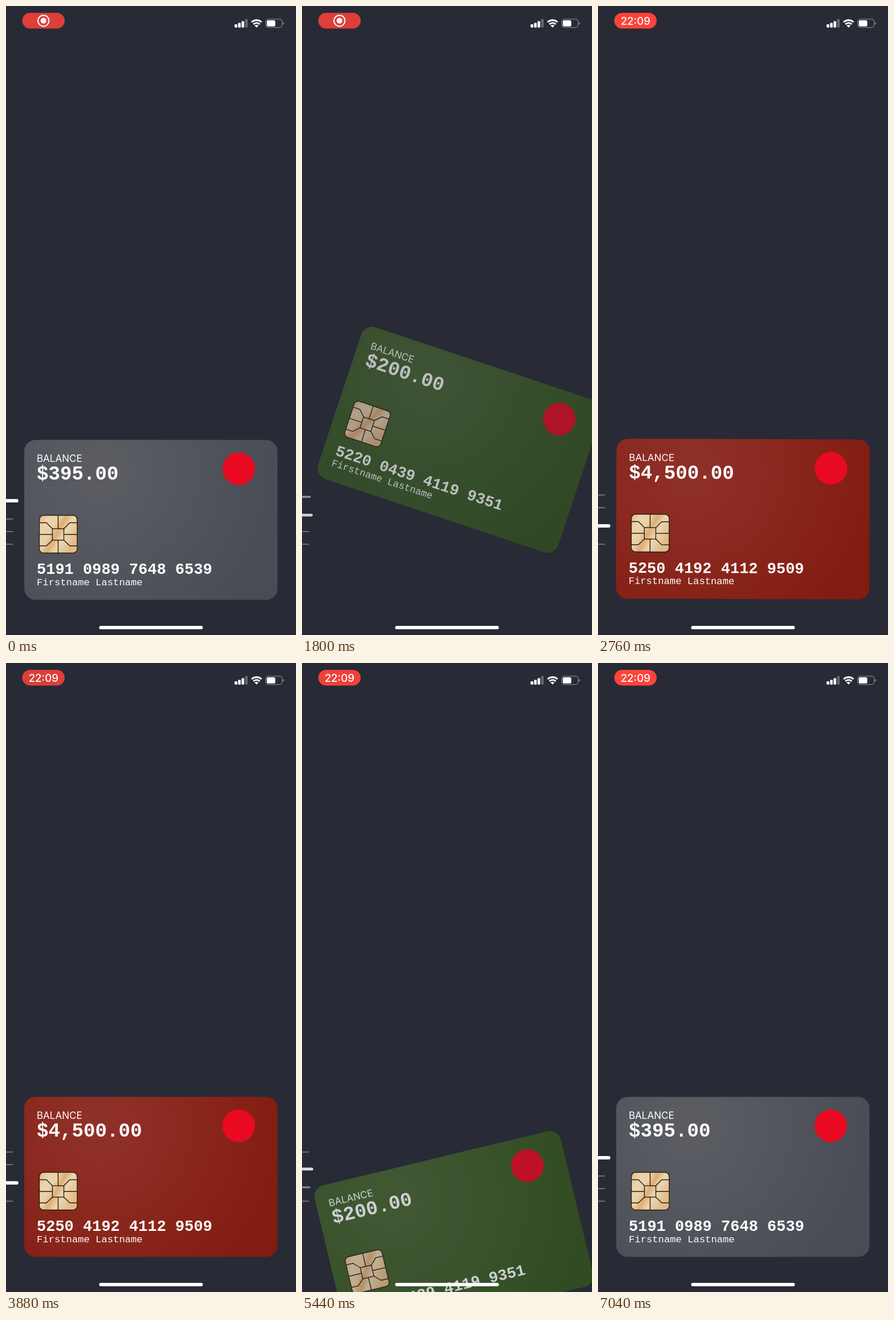
Recreate the animation shown at these times as an HTML page. Size 509 px wide and 1101 px high, loop 7080 ms.

```html
<!DOCTYPE html>
<html lang="en">
<head>
<meta charset="utf-8">
<title>Card wheel</title>
<style>
  html, body { margin: 0; width: 100%; height: 100%; overflow: hidden; background: #282a36; }
  svg { display: block; width: 100%; height: 100%; }
  .ui { font-family: Inter, Roboto, sans-serif; }
  .mono { font-family: "Liberation Mono", "Courier New", monospace; }
</style>
</head>
<body>
<svg viewBox="0 0 509 1101" preserveAspectRatio="xMinYMin meet">
  <defs>
    <linearGradient id="gold" x1="0" y1="0" x2="1" y2=".55">
      <stop offset="0" stop-color="#e3b987"/>
      <stop offset=".22" stop-color="#ecd5ae"/>
      <stop offset=".42" stop-color="#ead0a6"/>
      <stop offset=".56" stop-color="#dfae76"/>
      <stop offset=".72" stop-color="#ecd7b2"/>
      <stop offset="1" stop-color="#e2bb88"/>
    </linearGradient>
    <g id="chip" stroke="#2b1c12" stroke-width="1.4" fill="none">
      <rect x="58.5" y="891.5" width="66.5" height="66" rx="7.5" fill="url(#gold)"/>
      <rect x="81.5" y="915" width="20" height="20"/>
      <path d="M91.5 891.5V915M91.5 935V957.5M58.5 925H81.5M101.5 925H125"/>
      <path d="M58.5 904.5H71L81.5 915M125 904.5H112L101.5 915M58.5 945H71L81.5 935M125 945H112L101.5 935"/>
    </g>
  </defs>

  <g id="dashes"></g>
  <g id="cards"></g>

  <rect id="pill" x="28.5" y="12" width="74.5" height="27.5" rx="13.75" fill="#ff443a"/>
  <g id="rec" fill="#fff">
    <circle cx="65.8" cy="25.8" r="9.6" fill="none" stroke="#fff" stroke-width="2"/>
    <circle cx="65.8" cy="25.8" r="5"/>
  </g>
  <text id="clock" class="ui" x="65.8" y="32.6" font-size="18.6" font-weight="500" fill="#fff" text-anchor="middle">22:09</text>

  <g fill="#fff">
    <rect x="401.2" y="32" width="4.6" height="5.8" rx="1.2"/>
    <rect x="407.3" y="29.6" width="4.6" height="8.2" rx="1.2"/>
    <rect x="413.4" y="26.4" width="4.6" height="11.4" rx="1.2"/>
    <rect x="419.5" y="23" width="4.6" height="14.8" rx="1.2" opacity=".3"/>
    <path d="M439.8 37.8L436.4 34.3A4.9 4.9 0 0 1 443.2 34.3Z"/>
    <path d="M434.2 31.9A8 8 0 0 1 445.4 31.9M431.1 28.3A12.6 12.6 0 0 1 448.5 28.3" fill="none" stroke="#fff" stroke-width="2.9"/>
    <rect x="456" y="23.2" width="28.6" height="14.4" rx="4.4" fill="none" stroke="#fff" stroke-opacity=".42" stroke-width="1.2"/>
    <rect x="457.8" y="25" width="14.8" height="10.8" rx="2.6"/>
    <path d="M486 28V33Q488 32.3 488 30.5T486 28" opacity=".45"/>
  </g>
  <rect x="163.5" y="1085" width="182" height="6" rx="3" fill="#fff"/>
</svg>

<script>
const LOOP = 7080, STEP = 40, TURN = 60;
const PIVOT = "698 899.5";
const CLOCK_AT = 2320;

const cards = [
  { balance: "$395.00", number: "5191 0989 7648 6539", from: "#5a5c62", mid: "#52555c", to: "#484c55" },
  { balance: "$200.00", number: "5220 0439 4119 9351", from: "#476532", mid: "#3f5f2a", to: "#34561d" },
  { balance: "$4,500.00", number: "5250 4192 4112 9509", from: "#8f3028", mid: "#8a271d", to: "#831c10" },
];

// time, wheel position
const wheel = [
  [0, 0], [1480, 0], [1560, .06], [1680, .39], [1800, .693], [1920, .89], [2040, .975], [2160, 1],
  [2240, 1.04], [2360, 1.36], [2480, 1.71], [2600, 1.92], [2760, 1.997], [2880, 2],
  [4840, 2], [4920, 1.97], [5120, 1.75], [5280, 1.5], [5440, 1.225], [5600, 1.06], [5840, 1],
  [6200, 1], [6240, .997], [6360, .9], [6560, .52], [6720, .22], [6880, .04], [7020, 0], [7080, 0],
];

// time, opacity of the red pill
const pulse = [
  [0, .85], [160, .87], [560, 1], [1600, .83], [1800, .85], [2680, 1], [3740, .83],
  [4800, 1], [5440, .92], [5860, .86], [6240, .9], [6920, 1], [7080, 1],
];

// monotone cubic through the points
function curve(pts) {
  const rate = i => (pts[i + 1][1] - pts[i][1]) / (pts[i + 1][0] - pts[i][0]);
  const slope = pts.map((p, i) => {
    if (!i || i === pts.length - 1) return 0;
    const a = rate(i - 1), b = rate(i);
    return a * b > 0 ? 2 * a * b / (a + b) : 0;
  });
  return t => {
    let i = 0;
    while (i < pts.length - 2 && t >= pts[i + 1][0]) i++;
    const [t0, v0] = pts[i], [t1, v1] = pts[i + 1];
    const h = t1 - t0, u = (t - t0) / h, w = 1 - u;
    return v0 * (1 + 2 * u) * w * w + slope[i] * h * u * w * w
      + v1 * u * u * (3 - 2 * u) - slope[i + 1] * h * u * u * w;
  };
}

const wheelAt = curve(wheel), pulseAt = curve(pulse);
const $ = id => document.getElementById(id);
const set = (el, attrs) => { for (const k in attrs) el.setAttribute(k, attrs[k]); };

function label(cls, y, size, weight, text) {
  return `<text class="${cls}" x="54" y="${y}" font-size="${size}" font-weight="${weight}">${text}</text>`;
}

$("cards").innerHTML = cards.map((c, i) => `
  <g fill="#fff">
    <radialGradient id="skin${i}" gradientUnits="userSpaceOnUse" cx="165" cy="815" r="330">
      <stop offset=".1" stop-color="${c.from}"/>
      <stop offset=".5" stop-color="${c.mid}"/>
      <stop offset="1" stop-color="${c.to}"/>
    </radialGradient>
    <rect x="32" y="759.5" width="444.5" height="280" rx="20" fill="url(#skin${i})"/>
    ${label("ui", 798.3, 17, 400, "BALANCE")}
    ${label("mono", 829, 34.2, 700, c.balance)}
    <circle cx="408.5" cy="810" r="28.5" fill="#e90a22"/>
    <use href="#chip"/>
    ${label("mono", 994, 27, 700, c.number)}
    ${label("mono", 1013.5, 17.2, 400, "Firstname Lastname")}
  </g>`).join("");

$("dashes").innerHTML = "<rect/>".repeat(4);
const cardEls = [...$("cards").children], dashEls = [...$("dashes").children];

function drawDashes(pos) {
  let before = 0;
  dashEls.forEach((el, i) => {
    const w = Math.max(0, 1 - Math.abs(pos - i));
    const y = 856 + 22 * i + 10 * w + 20 * before;
    const thick = 2.2 + 3.8 * w, g = Math.round(110 + 145 * w);
    set(el, { x: -10, y: y - thick / 2, width: 22.5 + 9.3 * w, height: thick, rx: thick / 2, fill: `rgb(${g},${g},${g})` });
    before += w;
  });
}

function draw(t) {
  const pos = wheelAt(t);
  drawDashes(pos);
  cardEls.forEach((el, i) => {
    const d = pos - i;
    set(el, {
      display: i === Math.round(pos) ? "inline" : "none",
      opacity: 1 - Math.abs(d),
      transform: `rotate(${-d * TURN} ${PIVOT})`,
    });
  });
  const clock = t >= CLOCK_AT;
  set($("pill"), { opacity: pulseAt(t) });
  set($("rec"), { display: clock ? "none" : "inline" });
  set($("clock"), { display: clock ? "inline" : "none" });
}

const start = performance.now();
function tick(now) {
  const t = Math.max(0, now - start) % LOOP;
  draw(Math.floor(t / STEP) * STEP);
  requestAnimationFrame(tick);
}
draw(0);
requestAnimationFrame(tick);
</script>
</body>
</html>
```
